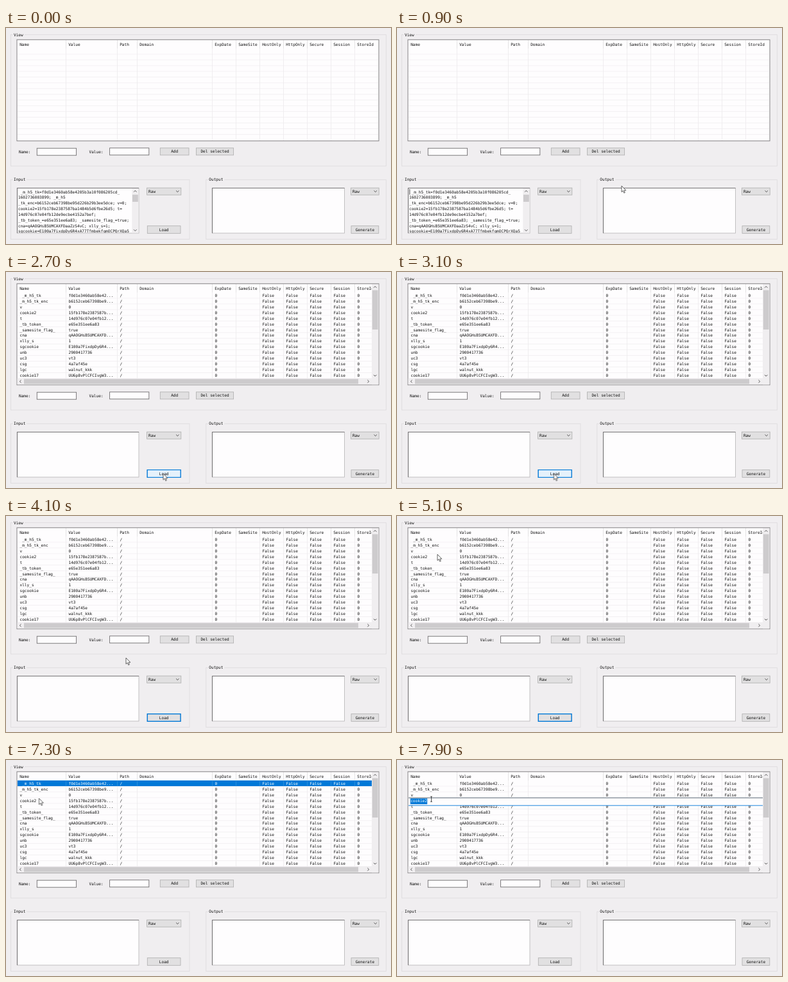
An HTML page that plays this animation: 600x338 px, repeating every 8000 ms.

```html
<!DOCTYPE html>
<html lang="en">
<head>
<meta charset="utf-8">
<title>Cookie editor</title>
<style>
html, body { margin: 0; width: 100%; height: 100%; overflow: hidden; background: #f0eef0; }
svg { display: block; width: 100vw; height: 100vh; }
text {
  font: 6.12px "DejaVu Sans Mono", monospace;
  white-space: pre; text-rendering: geometricPrecision; fill: #111;
}
.mid { text-anchor: middle; }
.light text { fill: #fff; }
.chevron { fill: none; stroke: #444; stroke-width: .9; }
.timed { visibility: hidden; animation: 8s step-end infinite; }

#full { animation-name: full; }
#draft { animation-name: draft; }
#caret { animation-name: caret; }
#hover { animation-name: hover; }
#press { animation-name: press; }
#focus { animation-name: focus; }
#first { animation-name: first; }
#fourth { animation-name: fourth; }
#edit { animation-name: edit; }
#arrow { animation-name: arrow, move; }
#beam { animation-name: edit; }

@keyframes draft { 0% { visibility: visible } 31.25%, 100% { visibility: hidden } }
@keyframes full { 31.25%, 100% { visibility: visible } }
@keyframes caret {
  6.25%, 21.25% { visibility: visible }
  13.75%, 26.25%, 100% { visibility: hidden }
}
@keyframes hover { 21.25% { visibility: visible } 46.25%, 100% { visibility: hidden } }
@keyframes press { 26.25% { visibility: visible } 31.25%, 100% { visibility: hidden } }
@keyframes focus { 31.25% { visibility: visible } 73.75%, 100% { visibility: hidden } }
@keyframes first { 73.75% { visibility: visible } 93.75%, 100% { visibility: hidden } }
@keyframes fourth { 93.75% { visibility: visible } 96.25%, 100% { visibility: hidden } }
@keyframes edit { 96.25%, 100% { visibility: visible } }
@keyframes arrow { 6.25% { visibility: visible } 96.25%, 100% { visibility: hidden } }
@keyframes move {
  0%, 6.25% { transform: translate(404px, 222px) }
  8.75% { transform: translate(388px, 229px) }
  11.25% { transform: translate(350px, 247px) }
  13.75% { transform: translate(305px, 268px) }
  16.25% { transform: translate(268px, 286px) }
  18.75% { transform: translate(250px, 296px) }
  21.25% { transform: translate(247px, 315px) }
  26.25% { transform: translate(246px, 315px) }
  33.75% { transform: translate(245px, 315.5px) }
  38.75% { transform: translate(244.4px, 315.5px) }
  46.25% { transform: translate(240px, 298px) }
  48.75% { transform: translate(222px, 266px) }
  51.25% { transform: translate(187px, 222px) }
  53.75% { transform: translate(145px, 180px) }
  56.25% { transform: translate(110px, 148px) }
  58.75% { transform: translate(89.5px, 130.5px) }
  61.25% { transform: translate(76px, 95px) }
  63.75% { transform: translate(63px, 60px) }
  66.25% { transform: translate(53px, 48px) }
  68.75% { transform: translate(46px, 42px) }
  73.75% { transform: translate(51px, 38px) }
  76.25% { transform: translate(53.5px, 35.5px) }
  88.75% { transform: translate(52.5px, 46px) }
  91.25% { transform: translate(51.5px, 60px) }
  93.75%, 100% { transform: translate(52.5px, 60px) }
}
</style>
</head>
<body>
<svg id="stage" viewBox="0 0 600 338" preserveAspectRatio="none"></svg>
<script>
const paper = '#fefdfe', face = '#f0eef0', blue = '#0078d7';
const edges = [17.5, 93.5, 173.5, 204.5, 321.5, 358.5, 395.5, 432.5, 469.5, 506.5, 543.5];
const heads = ['Name', 'Value', 'Path', 'Domain', 'ExpDate', 'SameSite',
  'HostOnly', 'HttpOnly', 'Secure', 'Session', 'StoreId'];
const cookies = [
  [' _m_h5_tk', 'f0d1e3460ab58e42...'],
  ['_m_h5_tk_enc', 'b6152ceb67398be9...'],
  ['v', '0'],
  ['cookie2', '15fb178e2387587b...'],
  ['t', '14d976c07e04fb12...'],
  ['_tb_token_', 'e65e351ee6a83'],
  ['_samesite_flag_', 'true'],
  ['cna', 'qAAOGHsB5UMCAXFD...'],
  ['xlly_s', '1'],
  ['sgcookie', 'E100a7FixdpDy6R4...'],
  ['unb', '2900417736'],
  ['uc3', 'vt3'],
  ['csg', '4a7af45e'],
  ['lgc', 'walnut_kkk'],
  ['cookie17', 'UU6p8vPlCFCIvgW3...']
];
const rawText = [
  ' _m_h5_tk=f0d1e3460ab58e4205b3a10f086205cd_',
  '1602736003899; _m_h5',
  '_tk_enc=b6152ceb67398be95d226b29b3ee5dce; v=0;',
  'cookie2=15fb178e2387587ba1484b5d6fbe26d5; t=',
  '14d976c07e04fb12de9ecbe4152a7bef;',
  '_tb_token_=e65e351ee6a83; _samesite_flag_=true;',
  'cna=qAAOGHsB5UMCAXFDaaZzS4vC; xlly_s=1;',
  'sgcookie=E100a7FixdpDy6R4xA77TfmbekfqmOCPQrXQa5'
];
const pitch = 8.97, rowTop = i => 32 + i * pitch;

// y is the vertical centre of the text
const label = (x, y, s, cls = '') => `<text x="${x}" y="${y + 2.1}" class="${cls}">${s}</text>`;
const rect = (x, y, x2, y2, fill, stroke = 'none', width = 1) =>
  `<rect x="${x}" y="${y}" width="${x2 - x}" height="${y2 - y}" fill="${fill}" stroke="${stroke}" stroke-width="${width}"/>`;
const line = (x, y, x2, y2, color, width = 1) =>
  `<path d="M${x} ${y}L${x2} ${y2}" stroke="${color}" stroke-width="${width}"/>`;
const timed = (id, body, cls = '') => `<g id="${id}" class="timed ${cls}">${body}</g>`;
const chevron = (x, y, turn) =>
  `<path class="chevron" d="M-2.2-1.1L0 1.1L2.2-1.1" transform="translate(${x} ${y}) rotate(${turn})"/>`;

const group = (x, y, x2, y2, name) => rect(x, y, x2, y2, 'none', '#dcdadc', .8)
  + rect(x + 3, y - 3, x + 6.5 + name.length * 3.68, y + 3, face) + label(x + 4.5, y, name);
const button = (x, y, x2, y2, name, fill = '#e1e0e1', stroke = '#adadad', width = .8) =>
  rect(x, y, x2, y2, fill, stroke, width) + label((x + x2) / 2, (y + y2) / 2, name, 'mid');
const load = (...look) => button(220.3, 309.7, 272, 321.3, 'Load', ...look);
const combo = (x, x2) => rect(x, 250.2, x2, 261.2, '#e1e0e1', '#adadad', .8)
  + label(x + 2.5, 255.9, 'Raw') + chevron(x2 - 5.5, 255.6, 0);
const memo = (x, x2) => rect(x, 250.5, x2, 321, paper, '#b4b2b4', .8)
  + `<path d="M${x} 321V250.5H${x2}" fill="none" stroke="#757375" stroke-width="1.1"/>`;

const cells = i => {
  const [name, value] = cookies[i];
  return [name, value, '/', '', '0', '', 'False', 'False', 'False', 'False', '0']
    .map((s, c) => s && label(edges[c] + 4, rowTop(i) + 4.6, s)).join('');
};
const selected = i => rect(18, rowTop(i), 570, rowTop(i + 1), blue)
  + edges.slice(1).map(x => line(x, rowTop(i), x, rowTop(i + 1), '#3a94dd', .7)).join('') + cells(i);

const grid = () => {
  let out = rect(17, 18.3, 581, 176.7, paper, '#858385', 1);
  for (let i = 1; i <= 15; i++) out += line(18, rowTop(i), 580, rowTop(i), '#f0eef0', .8);
  edges.slice(1).forEach(x => { out += line(x, 19, x, 32, '#dedcde', .8) + line(x, 32, x, 176, '#eceaec', .8); });
  heads.forEach((s, c) => { out += label(edges[c] + 3.7, 26, s); });
  return out;
};
const bars = () => rect(570, 19, 580.4, 176.2, face) + rect(17.6, 166.6, 580, 176.2, face)
  + rect(570.8, 28.5, 579.6, 90, '#cdcbcd') + rect(28, 167.4, 549, 175.2, '#cdcbcd')
  + chevron(575.2, 23.5, 180) + chevron(575.2, 162, 0)
  + chevron(22.5, 171.2, 90) + chevron(564.5, 171.2, -90);

const draft = () => `<svg x="18" y="251" width="178" height="69.5" viewBox="18 251 178 69.5">`
  + rawText.map((s, i) => label(19, 256.4 + i * 8.85, s)).join('') + '</svg>'
  + rect(196.3, 251.2, 206.4, 320.6, face) + rect(197, 260.8, 205.8, 272, '#cdcbcd')
  + chevron(201.3, 255.5, 180) + chevron(201.3, 316.5, 0);

const editor = () => rect(18, 59, 570, 71.3, paper)
  + line(18, 59.2, 570, 59.2, '#4a5a68', .9) + line(18, 71.2, 570, 71.2, blue, .9)
  + rect(20.8, 60.2, 47.2, 69.2, blue) + label(21.2, 64.3, 'cookie2');

document.getElementById('stage').innerHTML = [
  rect(0, 0, 600, 338, face),
  group(7.5, 10.4, 592.3, 216, 'View'),
  group(7.5, 237.3, 286, 330.6, 'Input'),
  group(311.8, 237.3, 592.3, 330.6, 'Output'),
  grid(),
  timed('full', cookies.map((_, i) => cells(i)).join('') + bars()),
  label(20, 193.4, 'Name:'), rect(48.3, 188.2, 109.6, 199.2, paper, '#6e6c6e', .9),
  label(129.5, 193.4, 'Value:'), rect(161.6, 187.8, 222.8, 198.8, paper, '#6e6c6e', .9),
  button(240.3, 187.8, 285, 198.9, 'Add'),
  button(296.4, 187.8, 354.6, 198.9, 'Del selected'),
  memo(17.5, 207), memo(321.5, 527.5),
  combo(219.6, 272.8), combo(537.4, 581.2),
  load(), button(538, 309.7, 580.8, 321.3, 'Generate'),
  timed('draft', draft()),
  timed('caret', line(19.8, 252, 19.8, 260.8, '#111', .8)),
  timed('focus', load('#e1e0e1', blue, 1.4)),
  timed('hover', load('#e5f1fb', blue, 1)),
  timed('press', load('#cce4f7', '#005499', 1)),
  timed('first', selected(0), 'light'),
  timed('fourth', selected(3), 'light'),
  timed('edit', editor(), 'light'),
  timed('arrow', '<path d="M0 0V9.6L2.2 7.6L3.8 11.2L5.3 10.5L3.8 7.1H6.8Z" fill="#fff" stroke="#222" stroke-width=".7"/>'),
  timed('beam', '<path d="M52 57.2H55M53.5 57.2V65.2M52 65.2H55" fill="none" stroke="#222" stroke-width=".8"/>')
].join('');
</script>
</body>
</html>
```
